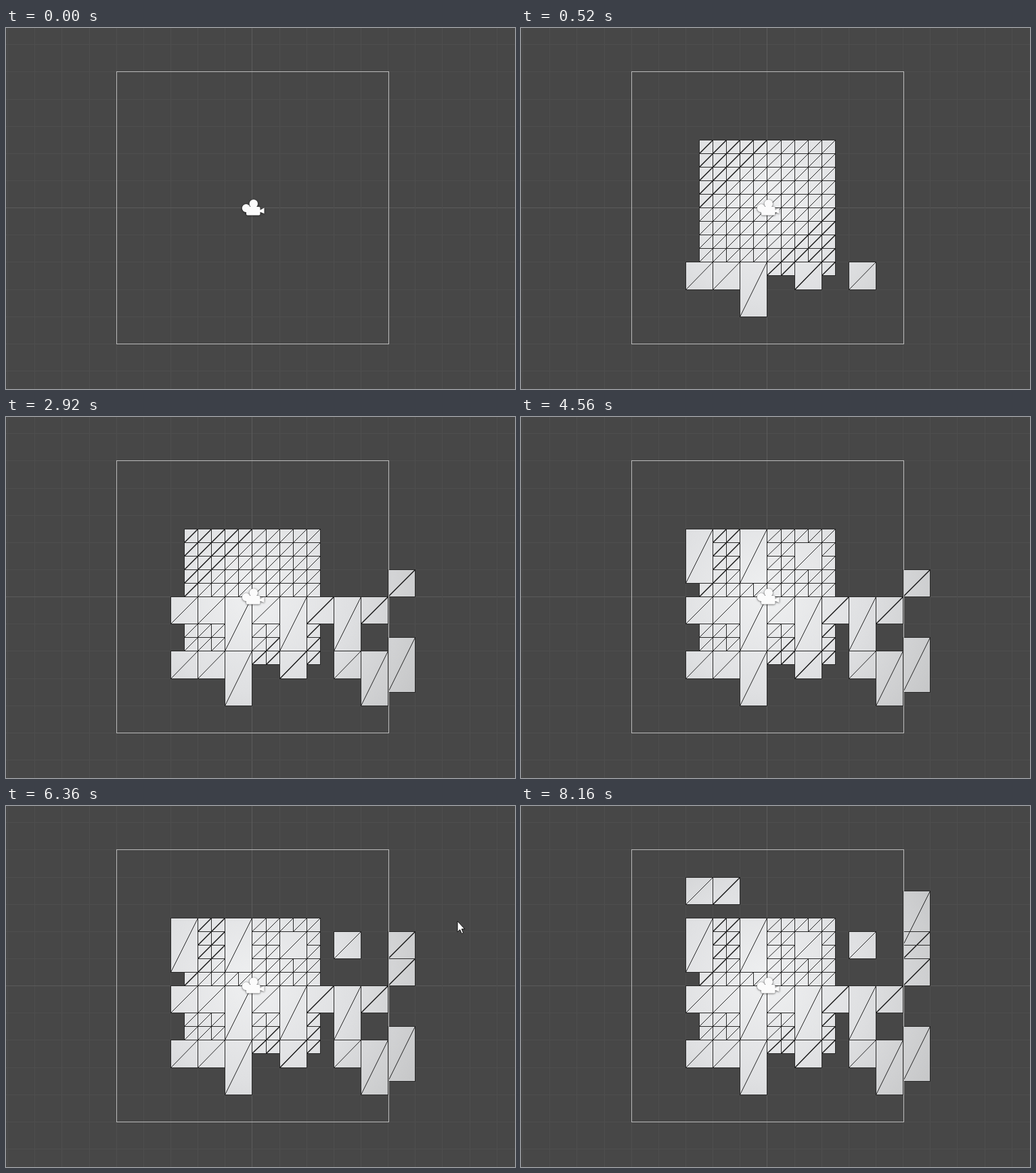
An HTML page with a canvas that plays this animation: 752x533 px, repeating every 9 s.

```html
<!DOCTYPE html>
<html>
<head>
<meta charset="utf-8">
<style>
  html, body { margin: 0; width: 100%; height: 100%; overflow: hidden; background: #474747; }
  canvas { display: block; }
</style>
</head>
<body>
<canvas width="752" height="533"></canvas>
<script>
const ctx = document.querySelector('canvas').getContext('2d');
const LOOP = 9000, UNIT = 20.07, GRID_START = 320;

// World units to the centre of a screen pixel
const px = u => Math.floor(363.95 + u * UNIT) + 0.5;
const py = u => Math.floor(265.6 + u * UNIT) + 0.5;

// Beats start fast and slow down steadily
const beatTime = k => 640 + 177 * k + 21.65 * k * k;

// Tiles are laid row by row from the left: s = square, T = tall, - = gap,
// ^ and v shift the following tiles up or down, | waits for the next beat
const rows = {
  bottom: [4, 'ssT|-s-s|T|^T|'],
  middle: [0, 's|sT|sT|sT|s|^^s|'],
  upper: [-5, 'T|-T|v-s|-s|-s|'],
  side: [-7, '--------T|'],
  top: [-8, 's|s']
};

function layTiles() {
  const tiles = [];
  let beat = -2;
  for (const [startY, score] of Object.values(rows)) {
    let x = -6, y = startY;
    for (const mark of score) {
      if (mark === '|') beat++;
      else if (mark === '^') y--;
      else if (mark === 'v') y++;
      else {
        if (mark !== '-') tiles.push({ x, y, w: 2, h: mark === 'T' ? 4 : 2, time: beatTime(beat) });
        x += 2;
      }
    }
  }
  return tiles;
}

const tiles = layTiles();
const cells = Array.from({ length: 100 }, (_, i) => ({ x: i % 10 - 5, y: Math.floor(i / 10) - 5, w: 1, h: 1 }));

const light = ctx.createRadialGradient(364, 260, 0, 364, 260, 290);
light.addColorStop(0, '#eff0f1');
light.addColorStop(0.5, '#dfe0e2');
light.addColorStop(1, '#c4c5c6');

function line(x1, y1, x2, y2, color, width = 1) {
  ctx.strokeStyle = color;
  ctx.lineWidth = width;
  ctx.beginPath();
  ctx.moveTo(x1, y1);
  ctx.lineTo(x2, y2);
  ctx.stroke();
}

function fillQuad({ x, y, w, h }) {
  ctx.fillStyle = light;
  ctx.fillRect(px(x), py(y), px(x + w) - px(x), py(y + h) - py(y));
}

function wireQuad({ x, y, w, h }) {
  const left = px(x), top = py(y), right = px(x + w), bottom = py(y + h);
  ctx.strokeStyle = '#2b2b2b';
  ctx.lineWidth = 1;
  ctx.strokeRect(left, top, right - left, bottom - top);
  // Square diagonals look heavier away from the middle
  const offset = Math.abs(x + y + h);
  const bold = w === h && offset >= 5 && offset <= 10;
  line(left, bottom, right, top, '#151515', bold ? 1.4 : 0.9);
}

function drawQuads(quads) {
  quads.forEach(fillQuad);
  quads.forEach(wireQuad);
}

function drawBackground() {
  ctx.fillStyle = '#474747';
  ctx.fillRect(0, 0, 752, 533);
  for (let i = -9; i <= 9; i++) {
    const color = i ? '#4e4e4e' : '#5b5b5b';
    line(px(2 * i), 0, px(2 * i), 533, color);
    line(0, py(2 * i), 752, py(2 * i), color);
  }
}

function drawCamera() {
  const shape = new Path2D();
  shape.arc(354.8, 266, 6, 0, 7);
  shape.closePath();
  shape.moveTo(372, 259.5);
  shape.arc(365.8, 259.5, 6.2, 0, 7);
  shape.closePath();
  shape.roundRect(355, 264, 20.5, 12.5, 2);
  shape.moveTo(375, 269);
  shape.lineTo(381.5, 265.5);
  shape.lineTo(381.5, 274);
  shape.lineTo(375, 271.5);
  shape.closePath();
  ctx.save();
  ctx.shadowColor = 'rgba(0,0,0,.7)';
  ctx.shadowBlur = 3;
  ctx.shadowOffsetY = 0.5;
  ctx.fillStyle = '#fbfbfb';
  ctx.fill(shape);
  ctx.restore();
}

function drawCursor(t) {
  if (t < 6200 || t >= 6600) return;
  const s = (t - 6360) / 200;
  ctx.save();
  ctx.translate(667 - 22 * s, 170 + 264 * s + 48 * s * s);
  const arrow = new Path2D('M0 0V16L3.7 12.6 6.2 18.4 8.6 17.4 6.2 11.7H10.8Z');
  ctx.fillStyle = '#fff';
  ctx.strokeStyle = '#111';
  ctx.lineWidth = 1;
  ctx.fill(arrow);
  ctx.stroke(arrow);
  ctx.restore();
}

function frame(now) {
  const t = now % LOOP;
  drawBackground();
  if (t >= GRID_START) drawQuads(cells);
  drawQuads(tiles.filter(tile => t >= Math.floor(tile.time / 40) * 40));
  ctx.strokeStyle = '#bababa';
  ctx.lineWidth = 1;
  ctx.strokeRect(163.5, 64.5, 402, 402);
  drawCamera();
  drawCursor(Math.floor(t / 40) * 40);
  requestAnimationFrame(frame);
}
requestAnimationFrame(frame);
</script>
</body>
</html>
```
